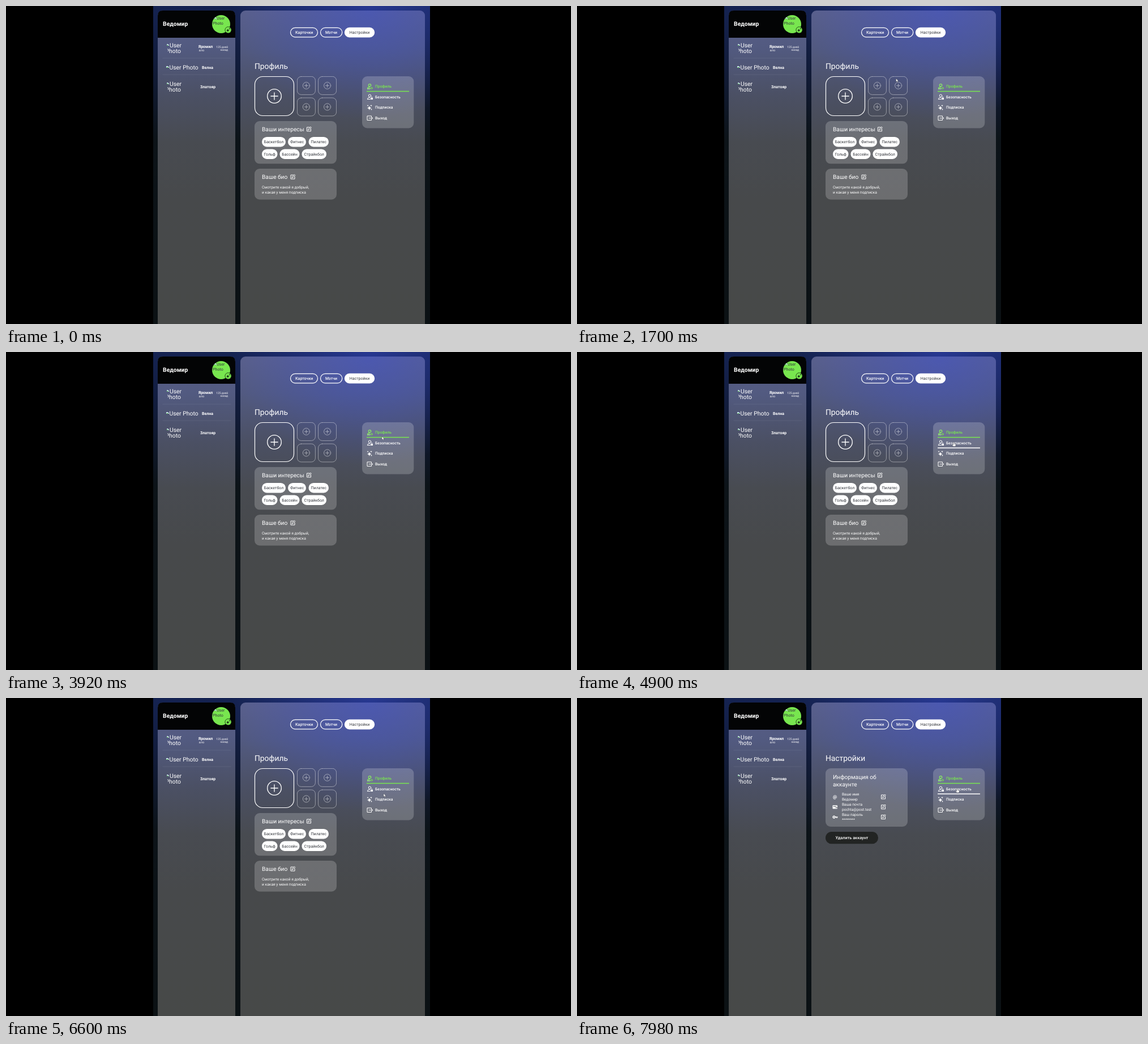
These frames come from a looping animation (998 by 561 pixels, 8000 ms). An HTML page:

```html
<!DOCTYPE html>
<html lang="ru">
<head>
<meta charset="utf-8">
<title>Профиль</title>
<style>
  html, body { margin: 0; width: 100%; height: 100%; overflow: hidden; background: #000; }
  svg { display: block; width: 100vw; height: 100vh; }
  text { font-family: Roboto, "Open Sans", sans-serif; fill: #fff; text-rendering: geometricPrecision; }
  .line { fill: none; stroke: #fff; stroke-linecap: round; stroke-linejoin: round; }
  .bold { font-weight: 700; }
  .medium { font-weight: 500; }
  .card { fill: #fff; fill-opacity: .2; }
  .dark { fill: #33363c; }
  .green { fill: #78e64f; }
  .menu { font-size: 6.8px; font-weight: 500; }
</style>
</head>
<body>
<svg viewBox="0 0 998 561" preserveAspectRatio="none">
  <defs>
    <linearGradient id="page" x2="0" y2="1">
      <stop offset="0" stop-color="#152352"/><stop offset=".2" stop-color="#111b38"/>
      <stop offset=".42" stop-color="#0c1318"/><stop offset="1" stop-color="#0b1114"/>
    </linearGradient>
    <linearGradient id="panel" gradientUnits="userSpaceOnUse" x1="0" y1="8" x2="0" y2="561">
      <stop offset="0" stop-color="#5a608a"/><stop offset=".12" stop-color="#525a80"/>
      <stop offset=".27" stop-color="#4b5064"/><stop offset=".42" stop-color="#484b51"/>
      <stop offset=".6" stop-color="#47494b"/><stop offset="1" stop-color="#474948"/>
    </linearGradient>
    <radialGradient id="glow" gradientUnits="userSpaceOnUse" cx="0" cy="0" r="1"
      gradientTransform="translate(640 10) scale(240 190)">
      <stop offset="0" stop-color="#3c50dc" stop-opacity=".46"/>
      <stop offset=".5" stop-color="#3c50dc" stop-opacity=".24"/>
      <stop offset="1" stop-color="#3c50dc" stop-opacity="0"/>
    </radialGradient>
    <clipPath id="stage"><rect x="260" width="489" height="561"/></clipPath>
    <clipPath id="avatar"><circle cx="380" cy="32" r="16"/></clipPath>
    <clipPath id="wide"><ellipse cx="311" cy="108" rx="29.5" ry="11"/></clipPath>
    <clipPath id="left"><path d="M284 62h40v24h-36q-4-9-4-24M284 130h40v24h-36q-4-9-4-24"/></clipPath>
    <g id="plus" class="line"><circle r="6"/><path d="M-3 0H3M0-3V3"/></g>
    <g id="edit" class="line"><path d="M1-3.5H-3.5V3.5H3.5V-.5M-1.2 1.2L-.8-.8 3-4.3 4.3-3 .6 .7Z"/></g>
    <g id="person" class="line"><circle cx="-.5" cy="-2.3" r="2.2"/><path d="M-4.5 4V3Q-4.2 .9-.5 .9M-4.5 4H0"/></g>
    <path id="spark" d="M0-4Q.5-.5 4 0Q.5 .5 0 4Q-.5 .5-4 0Q-.5-.5 0-4"/>
    <g id="broken"><path d="M0 3V0H3L5 2V3Z" fill="#cfe0f5"/><path d="M0 3L2 1.3 4 3Z" fill="#55b948"/></g>
  </defs>

  <rect width="998" height="561"/>
  <g clip-path="url(#stage)">
    <rect x="260" width="489" height="561" fill="url(#page)"/>
    <rect x="260" width="489" height="220" fill="url(#glow)"/>

    <!-- Sidebar -->
    <rect x="268" y="8" width="137" height="570" rx="9" fill="url(#panel)"/>
    <path d="M268 56V17Q268 8 277 8H396Q405 8 405 17V56Z" fill="#030405"/>
    <text class="bold" x="277" y="35.4" font-size="10.4">Ведомир</text>
    <circle class="green" cx="380" cy="32" r="16"/>
    <g clip-path="url(#avatar)" font-size="7.1">
      <use href="#broken" x="367" y="20"/>
      <text class="dark" x="372" y="23.6">User</text><text class="dark" x="365" y="32.6">Photo</text>
    </g>
    <circle class="green" cx="392.5" cy="42.3" r="5.6" stroke="#071007" stroke-width=".7"/>
    <g fill="#101a10"><use href="#spark" transform="translate(391.8 43) scale(.7)"/>
      <use href="#spark" transform="translate(395 40) scale(.35)"/></g>
    <path class="line" d="M277 92H397M277 121H397" stroke-width=".6" stroke-opacity=".13"/>
    <g font-size="10.4">
      <g clip-path="url(#left)">
        <use href="#broken" x="283" y="67"/><use href="#broken" x="283" y="135"/>
        <text x="289" y="73.2">User</text><text x="281.5" y="82.8">Photo</text>
        <text x="289" y="141.2">User</text><text x="281.5" y="150.8">Photo</text>
      </g>
      <g clip-path="url(#wide)"><use href="#broken" x="283" y="106"/><text x="288.5" y="111.7">User Photo</text></g>
    </g>
    <g class="bold" font-size="7">
      <text x="340" y="74.2">Яромил</text><text x="346" y="110.6">Велна</text><text x="343" y="144.6">Златояр</text>
    </g>
    <text x="340.5" y="80" font-size="5.8" fill-opacity=".85">ало</text>
    <g font-size="4.9" text-anchor="end"><text x="392" y="73.8">125 дней</text><text x="392" y="79">назад</text></g>

    <!-- Main panel -->
    <rect x="414" y="8" width="326" height="570" rx="9" fill="url(#panel)"/>
    <rect x="414" y="8" width="326" height="230" rx="9" fill="url(#glow)"/>
    <g class="line" stroke-width="1.2">
      <rect x="502.5" y="38.4" width="48" height="16.4" rx="8.2"/>
      <rect x="555.5" y="38.4" width="38.3" height="16.4" rx="8.2"/>
      <rect x="598.4" y="38.4" width="52.2" height="16.4" rx="8.2" fill="#fff"/>
    </g>
    <g font-size="7" text-anchor="middle">
      <text class="medium" x="526.7" y="48.9">Карточки</text><text class="medium" x="574.5" y="48.9">Мэтчи</text>
      <text class="dark" x="624.5" y="48.9">Настройки</text>
    </g>

    <!-- Profile view -->
    <g id="profile">
      <text x="439" y="111.3" font-size="13.8">Профиль</text>
      <rect class="line" x="439.5" y="124.5" width="69" height="69" rx="14" stroke-width="1.2"/>
      <use href="#plus" transform="translate(474 159) scale(2.05)" stroke-width=".65"/>
      <g id="tiles"></g>
      <rect class="card" x="439" y="203" width="145" height="75.3" rx="9"/>
      <text x="452" y="221" font-size="10.2">Ваши интересы</text>
      <use href="#edit" x="535" y="217.4"/>
      <g id="chips" font-size="7" text-anchor="middle"></g>
      <rect class="card" x="439" y="287" width="145" height="54.4" rx="9"/>
      <text x="452" y="305.2" font-size="10.2">Ваше био</text>
      <use href="#edit" x="506.5" y="301.6"/>
      <g font-size="6.7"><text x="452" y="322">Смотрите какой я добрый,</text><text x="452" y="330.8">и какая у меня подписка</text></g>
    </g>

    <!-- Settings view -->
    <g id="settings">
      <text x="439" y="111.3" font-size="13.8">Настройки</text>
      <rect class="card" x="439" y="124" width="145" height="103" rx="9"/>
      <g font-size="10.2"><text x="452" y="142.8">Информация об</text><text x="452" y="156">аккаунте</text></g>
      <g font-size="6.6">
        <text x="468" y="172.4">Ваше имя</text><text x="468" y="181.2">Ведомир</text>
        <text x="468" y="190">Ваша почта</text><text x="468" y="198.8">pochta@post.test</text>
        <text x="468" y="207.8">Ваш пароль</text><text x="468" y="217">********</text>
        <text class="bold" x="455.5" y="177" font-size="8" text-anchor="middle">@</text>
      </g>
      <rect x="451.5" y="189.2" width="8.5" height="6.2" rx="1" fill="#fff"/>
      <path class="line" d="M453 191.3H458M457 193.5H460" style="stroke:#555961"/>
      <circle cx="454" cy="210" r="1.8" class="line" stroke-width="1.5"/>
      <path class="line" d="M456 210H460M459 210V211.5" stroke-width="1.4"/>
      <use href="#edit" x="541" y="174.5"/><use href="#edit" x="541" y="192.3"/><use href="#edit" x="541" y="210"/>
      <rect x="439" y="236" width="93" height="21.3" rx="10.6" fill="#222423"/>
      <text class="medium" x="485.5" y="248.8" font-size="7.3" text-anchor="middle">Удалить аккаунт</text>
    </g>

    <!-- Menu -->
    <rect class="card" x="629" y="124" width="91.3" height="91.4" rx="9"/>
    <g class="menu">
      <text class="green" x="652" y="143.8">Профиль</text><text x="652" y="162.5">Безопасность</text>
      <text x="652" y="181.3">Подписка</text><text x="652" y="200">Выход</text>
    </g>
    <g stroke-width="1">
      <g transform="translate(643 142)"><use href="#person" style="--c:0"/>
        <path class="line" d="M-4.5 4V3Q-4.2 .9-.5 .9M-4.5 4H0M-2.7-2.3a2.2 2.2 0 1 0 4.4 0a2.2 2.2 0 1 0-4.4 0" style="stroke:#78e64f" stroke-width="1.1"/>
        <circle cx="2.8" cy="2.9" r="1.5" class="line" style="stroke:#78e64f"/></g>
      <g transform="translate(643 160.5)"><use href="#person"/>
        <rect x="1" y="1.5" width="4" height="3" rx=".5" fill="#fff"/>
        <path class="line" d="M2 1.5V.6a1 1 0 0 1 2 0V1.5" stroke-width=".7"/></g>
      <path class="line" d="M645.5 195.8V194H638V201.5H645.5V199.7M641 197.8H647.5M645.7 196L647.5 197.8 645.7 199.6"/>
    </g>
    <g fill="#fff"><use href="#spark" x="641.8" y="180"/>
      <use href="#spark" transform="translate(645 175.7) scale(.45)"/><use href="#spark" transform="translate(639 175.7) scale(.35)"/>
      <use href="#spark" transform="translate(645.4 182.5) scale(.35)"/></g>
    <rect class="green" x="637" y="149.8" width="75" height="1.5"/>
    <rect id="hoverLine" y="168.5" height="1.5" fill="#fff"/>

    <g id="cursor" fill="#fff" stroke="#34363d" stroke-width=".4" stroke-linejoin="round">
      <path id="arrow" d="M0 0V5.8L1.4 4.6 2.4 6.8 3.4 6.3 2.5 4.3H4.2Z"/>
      <path id="hand" d="M-.8 .5Q-.8-.3 0-.3T.8 .5V2.7L3.2 3.2Q4 3.5 3.8 4.3L3.2 7H-.6L-2.7 4.6Q-2.5 3.6-1.6 4L-.8 4.5Z"/>
    </g>
  </g>
</svg>
<script>
  const byId = id => document.getElementById(id);
  const clamp = v => Math.max(0, Math.min(1, v));
  const show = (id, visible) => byId(id).style.display = visible ? "" : "none";

  byId("tiles").innerHTML = [514.4, 551.6].flatMap(x => [124.4, 162].map(y =>
    `<g opacity=".6"><rect class="line" x="${x}" y="${y}" width="32" height="32" rx="7" stroke-width=".7"/>
     <use href="#plus" x="${x + 16}" y="${y + 16}" stroke-width=".8"/></g>`)).join("");

  const chips = [
    ["Баскетбол", 452, 231, 42], ["Фитнес", 498, 231, 32], ["Пилатес", 534.5, 231, 35.5],
    ["Гольф", 452, 252.5, 27.5], ["Бассейн", 483.5, 252.5, 35], ["Страйкбол", 522.5, 252.5, 43.5]];
  byId("chips").innerHTML = chips.map(([label, x, y, w]) =>
    `<rect x="${x}" y="${y}" width="${w}" height="17.4" rx="8.7" fill="#fff"/>
     <text class="dark" x="${x + w / 2}" y="${y + 11}">${label}</text>`).join("");

  // Cursor waypoints: time, x, y
  const path = [
    [500, 520, 565], [1250, 556, 170], [1700, 563.5, 128], [2540, 633, 132], [3920, 664, 149],
    [4400, 665, 156], [5760, 666, 167], [6700, 667, 168.5], [7400, 670, 167], [7540, 671, 162], [7980, 671.5, 160]];
  const hovers = [[4250, 5728], [7480, 8300]];
  const growTime = 300;
  const clickTime = 7900;

  function cursorAt(t) {
    const i = path.findIndex(p => p[0] > t);
    const a = path[i < 0 ? path.length - 1 : Math.max(0, i - 1)];
    const b = path[i < 0 ? path.length - 1 : i];
    const k = a === b ? 0 : (t - a[0]) / (b[0] - a[0]);
    const ease = k * k * (3 - 2 * k);
    return [1, 2].map(n => a[n] + (b[n] - a[n]) * ease);
  }

  function render(t) {
    const [x, y] = cursorAt(t);
    byId("cursor").setAttribute("transform", `translate(${x} ${y})`);
    show("cursor", t >= path[0][0]);
    const hovered = hovers.some(([from, to]) => t >= from && t < to);
    show("hand", hovered);
    show("arrow", !hovered);

    const grown = Math.max(...hovers.map(([from, to]) =>
      Math.min(clamp((t - from) / growTime), clamp(1 - (t - to) / growTime))));
    const line = byId("hoverLine");
    line.setAttribute("x", 674.5 - 37.5 * grown);
    line.setAttribute("width", 75 * grown);
    line.setAttribute("opacity", clamp(grown * 2.2));

    show("profile", t < clickTime);
    show("settings", t >= clickTime);
  }

  const start = performance.now();
  function tick() {
    render((performance.now() - start) % 8000);
    requestAnimationFrame(tick);
  }
  tick();
</script>
</body>
</html>
```
